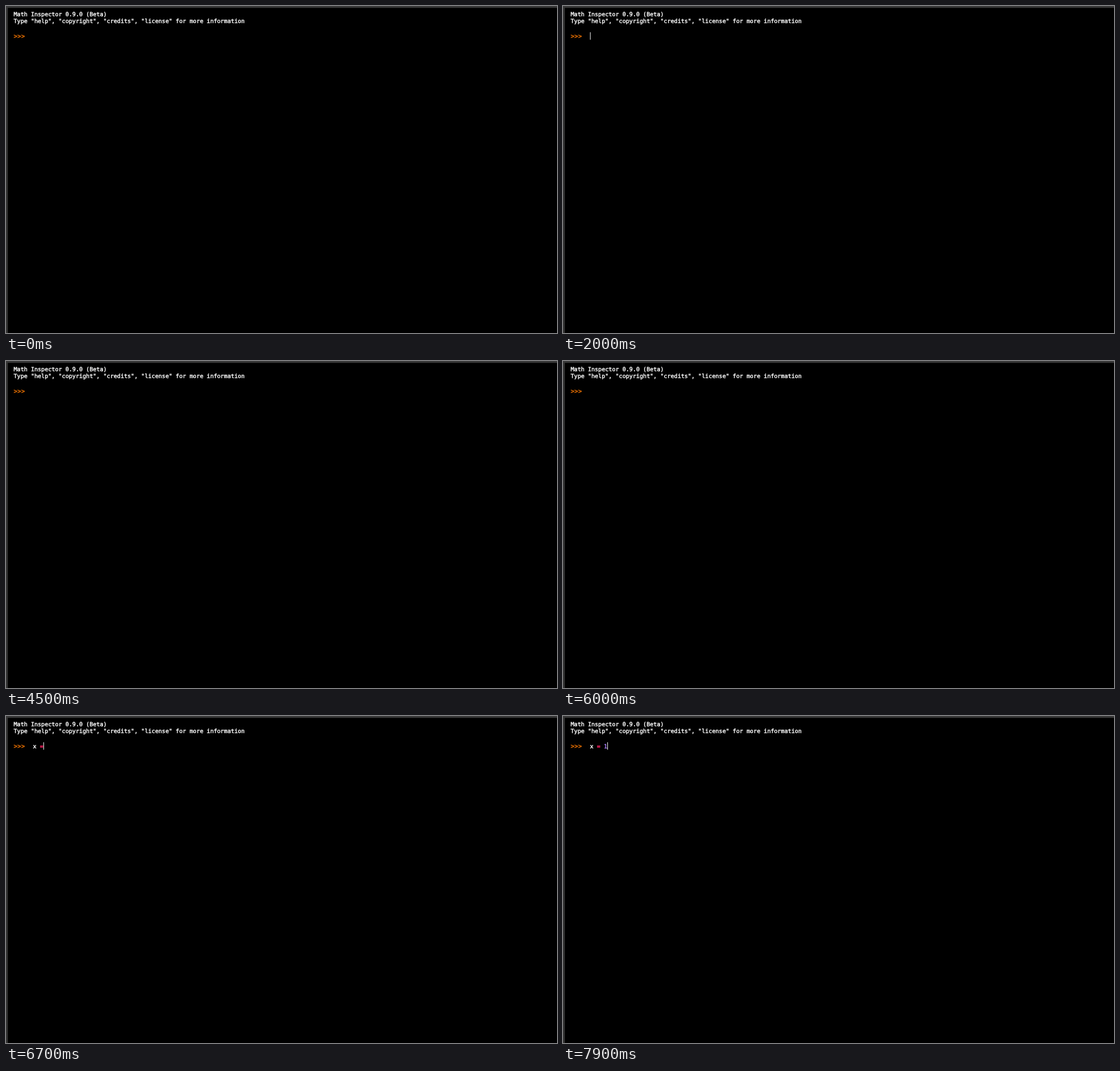
These frames come from a looping animation (971 px wide and 577 px high, 8 s). An HTML page:

```html
<!DOCTYPE html>
<html lang="en">
<head>
<meta charset="utf-8">
<title>Console</title>
<style>
  html, body { margin: 0; width: 100%; height: 100%; overflow: hidden; background: #000; }
  svg { display: block; width: 971px; height: 577px; }
  text {
    font: 10.1px "DejaVu Sans Mono", monospace;
    text-rendering: geometricPrecision;
    white-space: pre;
    fill: #fff;
    stroke: #fff;
    stroke-width: .42px;
  }
  .prompt { font-size: 11px; font-weight: bold; fill: #e06c00; stroke: #e06c00; stroke-width: .15px; }
  .operator { fill: #f9205f; stroke: #f9205f; }
  .number { fill: #ae81ff; stroke: #ae81ff; }
</style>
</head>
<body>
<svg viewBox="0 0 971 577">
  <rect width="971" height="577" fill="#000"/>
  <rect width="3.3" height="577" fill="#333"/>
  <rect width="971" height="3.3" fill="#383838"/>
  <text x="13.5" y="18.1">Math Inspector 0.9.0 (Beta)</text>
  <text x="13.5" y="30.1">Type "help", "copyright", "credits", "license" for more information</text>
  <text class="prompt" x="13.5" y="56.8">&gt;&gt;&gt;</text>
  <g id="input"></g>
  <rect id="cursor" y="46.3" width="1.1" height="13.2" fill="#e4e4e4"/>
</svg>
<script>
const LOOP = 8000;
const TYPE_START = 6500, KEY_TIME = 100;
const BLINK = 1500, BLINK_OFF = 500, BLINK_AGAIN = 7900;
const LEFT = 47.6, ADVANCE = 6.08, BASELINE = 56.6;
const LINE = "x = 1";
const CLASSES = { "=": "operator", "1": "number" };

const input = document.getElementById("input");
const cursor = document.getElementById("cursor");

const glyphs = [...LINE].map((char, i) => {
  const el = document.createElementNS("http://www.w3.org/2000/svg", "text");
  el.setAttribute("class", CLASSES[char] || "");
  el.setAttribute("x", LEFT + i * ADVANCE);
  el.setAttribute("y", BASELINE);
  el.textContent = char;
  input.appendChild(el);
  return el;
});

function typedCount(t) {
  if (t < TYPE_START) return 0;
  return Math.min(LINE.length, Math.floor((t - TYPE_START) / KEY_TIME) + 1);
}

function cursorVisible(t, count) {
  if (count === 0) return t % BLINK >= BLINK_OFF;
  return count < LINE.length || t >= BLINK_AGAIN;
}

function show(el, on) {
  el.setAttribute("visibility", on ? "visible" : "hidden");
}

function draw(t) {
  const count = typedCount(t);
  glyphs.forEach((el, i) => show(el, i < count));
  cursor.setAttribute("x", LEFT + count * ADVANCE);
  show(cursor, cursorVisible(t, count));
}

const start = performance.now();
function tick() {
  draw((performance.now() - start) % LOOP);
  requestAnimationFrame(tick);
}
tick();
</script>
</body>
</html>
```
